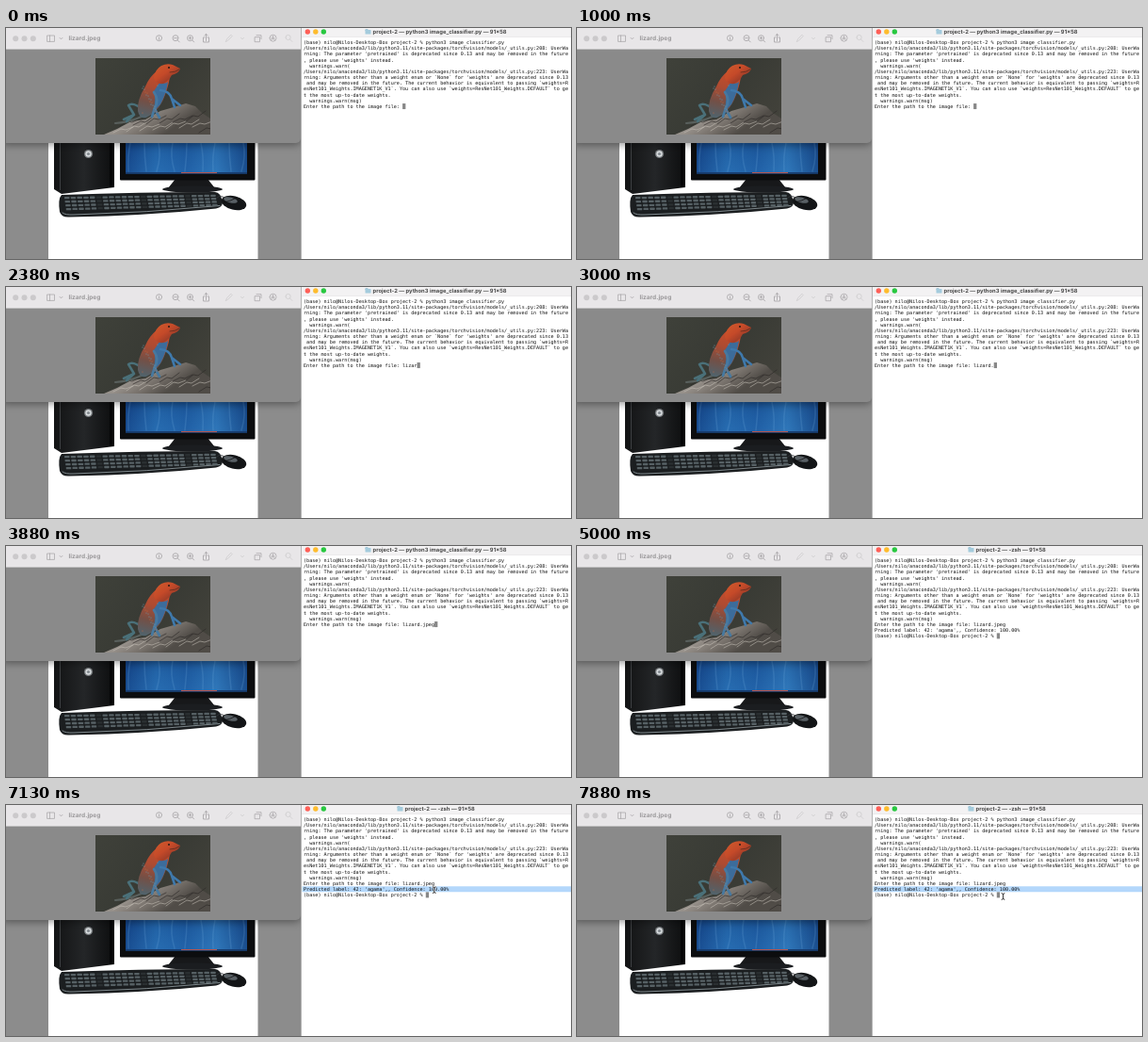
Write an HTML page with a canvas that moves like this. It is 600x245 px and loops after 8 s.

```html
<!DOCTYPE html>
<html lang="en">
<head>
<meta charset="utf-8">
<title>Image classifier demo</title>
<style>
html, body { margin: 0; width: 100%; height: 100%; overflow: hidden; background: #fff; }
canvas { display: block; width: 600px; height: 245px; }
</style>
</head>
<body>
<canvas id="stage" width="600" height="245"></canvas>
<script>
const ctx = document.getElementById('stage').getContext('2d');
const LOOP = 8000;
const MONO = '"DejaVu Sans Mono", monospace';
const SANS = 'Inter, sans-serif';
const COL = 3.09, ROW = 6.16, LEFT = 316, TOP = 15.3;

const prompt = '(base) nilo@Nilos-Desktop-Box project-2 % ';
const question = 'Enter the path to the image file: ';
const utils = '/Users/nilo/anaconda3/lib/python3.11/site-packages/torchvision/models/_utils.py';
const log = [
  prompt + 'python3 image_classifier.py',
  utils + ':208: UserWa',
  "rning: The parameter 'pretrained' is deprecated since 0.13 and may be removed in the future",
  ", please use 'weights' instead.",
  '  warnings.warn(',
  utils + ':223: UserWa',
  "rning: Arguments other than a weight enum or `None` for 'weights' are deprecated since 0.13",
  ' and may be removed in the future. The current behavior is equivalent to passing `weights=R',
  'esNet101_Weights.IMAGENET1K_V1`. You can also use `weights=ResNet101_Weights.DEFAULT` to ge',
  't the most up-to-date weights.',
  '  warnings.warn(msg)'
];
const answer = 'lizard.jpeg';
const result = "Predicted label: 42: 'agama',, Confidence: 100.00%";

const keyTimes = [1500, 1630, 1750, 2000, 2250, 2630, 2880, 3130, 3380, 3500, 3750];
const ENTER = 4130, OUTPUT = 4250, RETITLE = 4500, SELECT = 6880;
// time, x, y of the text pointer
const pointer = [[5750, 470, 104], [6250, 456, 92], [6500, 452, 89], [7000, 452, 89],
                 [7380, 462, 93], [7750, 453, 97], [8000, 452, 97]];

function rect(x, y, w, h, fill, r = 0) {
  ctx.fillStyle = fill;
  ctx.beginPath();
  ctx.roundRect(x, y, w, h, r);
  ctx.fill();
}

function disc(x, y, rx, fill, ry = rx, turn = 0) {
  ctx.fillStyle = fill;
  ctx.beginPath();
  ctx.ellipse(x, y, rx, ry, turn, 0, 7);
  ctx.fill();
}

function shape(path, fill) {
  ctx.fillStyle = fill;
  ctx.fill(new Path2D(path));
}

function stroke(path, color, width = 0.8) {
  ctx.strokeStyle = color;
  ctx.lineWidth = width;
  ctx.lineCap = ctx.lineJoin = 'round';
  ctx.stroke(new Path2D(path));
}

function fade(x0, y0, x1, y1, ...colors) {
  const g = ctx.createLinearGradient(x0, y0, x1, y1);
  colors.forEach((c, i) => g.addColorStop(i / (colors.length - 1), c));
  return g;
}

// Draws at ten times the size, scaled down, to keep fractional advances.
function text(str, x, y, size, color, family, weight = 400) {
  ctx.save();
  ctx.translate(x, y);
  ctx.scale(0.1, 0.1);
  ctx.font = `${weight} ${size * 10}px ${family}`;
  ctx.textRendering = 'geometricPrecision';
  ctx.textBaseline = 'alphabetic';
  ctx.fillStyle = color;
  ctx.fillText(str, 0, 0);
  ctx.restore();
}

function lights(x, y, gap, r, colors) {
  colors.forEach((c, i) => disc(x + i * gap, y, r, c));
}

function clip(x, y, w, h, draw) {
  ctx.save();
  ctx.beginPath();
  ctx.rect(x, y, w, h);
  ctx.clip();
  draw();
  ctx.restore();
}

function computer() {
  rect(0, 110, 313, 135, '#8c8c8c');
  rect(45, 110, 222.5, 135, '#fff');
  // tower
  shape('M51 110H115V169L59 176L51 171Z', fade(51, 0, 115, 0, '#121314', '#242628', '#0c0d0e'));
  rect(57, 122, 1, 50, '#3d3f42');
  rect(110, 122, 5, 47, '#050506');
  disc(87.5, 133.5, 4.6, '#75797c');
  disc(87.5, 133.5, 3.2, '#d8dcde');
  disc(87.5, 133.5, 1.6, '#858b91');
  // monitor
  shape('M180 160H214L222 170H172Z', '#17181a');
  disc(198, 171, 32, '#1b1d20', 3.5);
  rect(121, 110, 143.5, 51.5, '#0c0d0f', 1);
  rect(127, 110, 129, 44.5, fade(127, 0, 256, 0, '#134488', '#2469ae', '#1d5ca3', '#2d75b8', '#154686'));
  rect(127, 110, 129, 44.5, fade(0, 122, 0, 154, '#0a2d6633', '#3d86c822'));
  for (let i = 0; i < 9; i++) {
    stroke(`M${132 + i * 15} 122q${i % 3 * 3 - 3} 14 ${i % 2 * 4 - 2} 30`, '#78b5e230', 1.6);
  }
  rect(127, 153, 129, 1.5, '#173c70');
  rect(186, 153, 38, 1, '#b8554d');
  // keyboard
  shape('M59 177Q142 174 222 174Q228 174 230 185Q230 190 223 191.5Q150 199 67 200.5Q59 201 57 195Q55 181 59 177Z', '#1b1e20');
  stroke('M60 196Q63 198.5 72 198Q150 196 227 188.5', '#7d878b', 1);
  for (let row = 0; row < 4; row++) {
    for (let i = 0; i < 24; i++) {
      const x = 62 + row * 0.6 + i * 6.75;
      rect(x, 179 + row * 4 - i * 0.1 - row * i * 0.03, 5.4, 2.3, i % 7 === 5 ? '#2a2f31' : '#566064', 0.6);
    }
  }
  // mouse
  stroke('M224 180Q228 176 233 181', '#33373a', 0.8);
  disc(242, 185.5, 13.5, '#131517', 7.2, 0.24);
  disc(238.5, 182.5, 7.5, '#596065', 2.9, 0.25);
  stroke('M231 185Q238 184 245 180', '#090a0b', 0.7);
}

function lizard() {
  rect(95, 32, 122, 81, fade(95, 32, 217, 113, '#3f413a', '#383a34', '#44433c'));
  // rock
  shape('M104 113L118 107L133 99L148 97L164 88L178 84L191 80L201 83L208 90L217 96V113Z',
    fade(150, 86, 168, 113, '#98928c', '#77716b', '#504c47'));
  for (let i = 0; i < 14; i++) {
    const x = 114 + i * 7;
    const y = 111 - i * 7 % 13;
    stroke(`M${x} ${y}l8 -${4 + i % 3}l5 1l8 -${3 + i % 4}`, i % 2 ? '#2b2927a0' : '#c5c0b690', 1);
  }
  // tail and hind leg
  stroke('M146 93Q132 100 116 101', '#59605d', 2);
  stroke('M146 87Q135 78 130 82L136 92L125 97M136 92L128 99', '#4a7079', 2.6);
  // body
  shape('M161 45Q152 52 148 62Q139 76 140 88Q142 97 149 95Q159 91 166 78Q172 65 174 52Z',
    fade(160, 47, 148, 95, '#c54c2a', '#ad4b32', '#725047', '#51636c'));
  shape('M163 58Q170 60 172 57Q170 70 164 81L156 89Q160 76 157 67Z', '#3c6c9b');
  // forelegs
  stroke('M164 66Q174 67 176 75L185 82M176 75L179 84', '#3f79ac', 2.5);
  stroke('M157 68Q163 76 158 85L155 94M158 86L163 95', '#4779a0', 2.7);
  // head
  shape('M157 53Q158 44 165 40Q171 37 177 39L185 43Q184 48 176 50Q173 56 167 59Q159 60 157 53Z',
    fade(162, 38, 176, 57, '#cf592c', '#c54a29', '#8e3828'));
  stroke('M174 47Q180 47 184 44', '#5d2b20', 0.8);
  disc(173, 42, 1, '#241914');
  for (let i = 0; i < 20; i++) {
    disc(145 + i * 13 % 17, 90 - i * 7 % 31, 0.6, i % 3 ? '#7293a1' : '#c4683f');
  }
}

function toolbar() {
  const ink = '#a5a3a5', faint = '#cfcdcf';
  lights(10.2, 11.2, 9.3, 3, Array(3).fill('#cbc9cb'));
  text('lizard.jpeg', 66.5, 13.4, 6.55, '#9b999b', SANS, 700);
  stroke('M44 8h7.5v6.4h-7.5ZM46.5 8v6.4M57 10.3l1.5 1.6l1.5 -1.6', ink, 0.7);
  for (const x of [162.5, 180, 195.5]) {
    ctx.beginPath();
    ctx.arc(x, 10.7, 3, 0, 7);
    ctx.strokeStyle = ink;
    ctx.lineWidth = 0.8;
    ctx.stroke();
  }
  stroke('M162.5 10.4v2M162.5 9v.1M178.5 10.7h3M182.2 12.9l2 2M194 10.7h3M195.5 9.2v3M197.7 12.9l2 2', ink);
  stroke('M211 10h-1.5v5h6v-5h-1.5M212.5 13.5V6.5M210.8 8L212.5 6.3L214.2 8', ink);
  stroke('M233.5 14.2l1 -2.4l4.4 -4.6l1.4 1.4l-4.6 4.6ZM249.5 10.3l1.5 1.6l1.5 -1.6', faint);
  stroke('M264.5 9.7h5v5h-5ZM266 7.7h5v4', ink, 0.7);
  stroke('M280 10.7a3.5 3.5 0 1 0 7 0a3.5 3.5 0 1 0 -7 0M282 12.5l1.5 -4l1.5 4M282.5 11.2h2', ink, 0.7);
  stroke('M297 10a2.6 2.6 0 1 0 5.2 0a2.6 2.6 0 1 0 -5.2 0M301.6 12.1l2.2 2.3', faint);
}

function previewWindow() {
  ctx.save();
  ctx.shadowColor = '#0006';
  ctx.shadowBlur = 8;
  ctx.shadowOffsetY = 2;
  rect(-6, -6, 319, 128, '#8a8a8a', 5);
  ctx.restore();
  rect(0, 0, 313, 22.5, '#e8e6e8');
  rect(0, 22, 313, 0.6, '#c8c8c8');
  toolbar();
  clip(95, 32, 122, 81, lizard);
}

function line(str, row) {
  text(str, LEFT, TOP + row * ROW + 1.8, 5.13, '#111', MONO);
}

function caret(col, row) {
  rect(LEFT + col * COL, TOP + row * ROW - 3, 3.3, 6, '#888');
}

function terminal(t) {
  rect(313, 0, 287, 245, '#fff');
  rect(313, 0, 1, 245, '#b5b5b5');
  rect(314, 0, 286, 9.5, '#f3f2f3');
  rect(314, 9.2, 286, 0.5, '#dedede');
  lights(320.3, 4, 8.5, 2.7, ['#fe5f57', '#febc2e', '#28c840']);

  const done = t >= RETITLE;
  const titleX = done ? 423.5 : 389.5;
  rect(titleX - 8, 1.3, 3, 2, '#8ab9cf', 0.5);
  rect(titleX - 8, 2, 6, 4.6, '#a4cbdd', 0.6);
  text(`project-2 — ${done ? '-zsh' : 'python3 image_classifier.py'} — 91×58`, titleX, 6, 5.85, '#464646', SANS, 700);

  if (t >= SELECT) rect(314.5, TOP + 12 * ROW - 3, 285.5, 6.1, '#b3d7fb');
  log.forEach(line);
  const typed = answer.slice(0, keyTimes.filter(k => t >= k).length);
  line(question + typed, 11);
  if (t < ENTER) {
    caret(question.length + typed.length, 11);
  } else if (t < OUTPUT) {
    caret(0, 12);
  } else {
    line(result, 12);
    line(prompt, 13);
    caret(prompt.length, 13);
  }
}

function drawPointer(t) {
  const i = pointer.findIndex(p => p[0] > t);
  if (i < 1) return;
  const [t0, x0, y0] = pointer[i - 1], [t1, x1, y1] = pointer[i];
  const u = (t - t0) / (t1 - t0), k = u * u * (3 - 2 * u);
  ctx.save();
  ctx.translate(x0 + (x1 - x0) * k, y0 + (y1 - y0) * k);
  const beam = 'M-1.4 -3.3Q0 -3.3 0 -2.3V2.3Q0 3.3 -1.4 3.3M1.4 -3.3Q0 -3.3 0 -2.3M0 2.3Q0 3.3 1.4 3.3';
  stroke(beam, '#fff', 1.8);
  stroke(beam, '#222', 0.9);
  ctx.restore();
}

function frame(now) {
  const t = now % LOOP;
  computer();
  previewWindow();
  terminal(t);
  drawPointer(t);
  requestAnimationFrame(frame);
}
requestAnimationFrame(frame);
</script>
</body>
</html>
```
